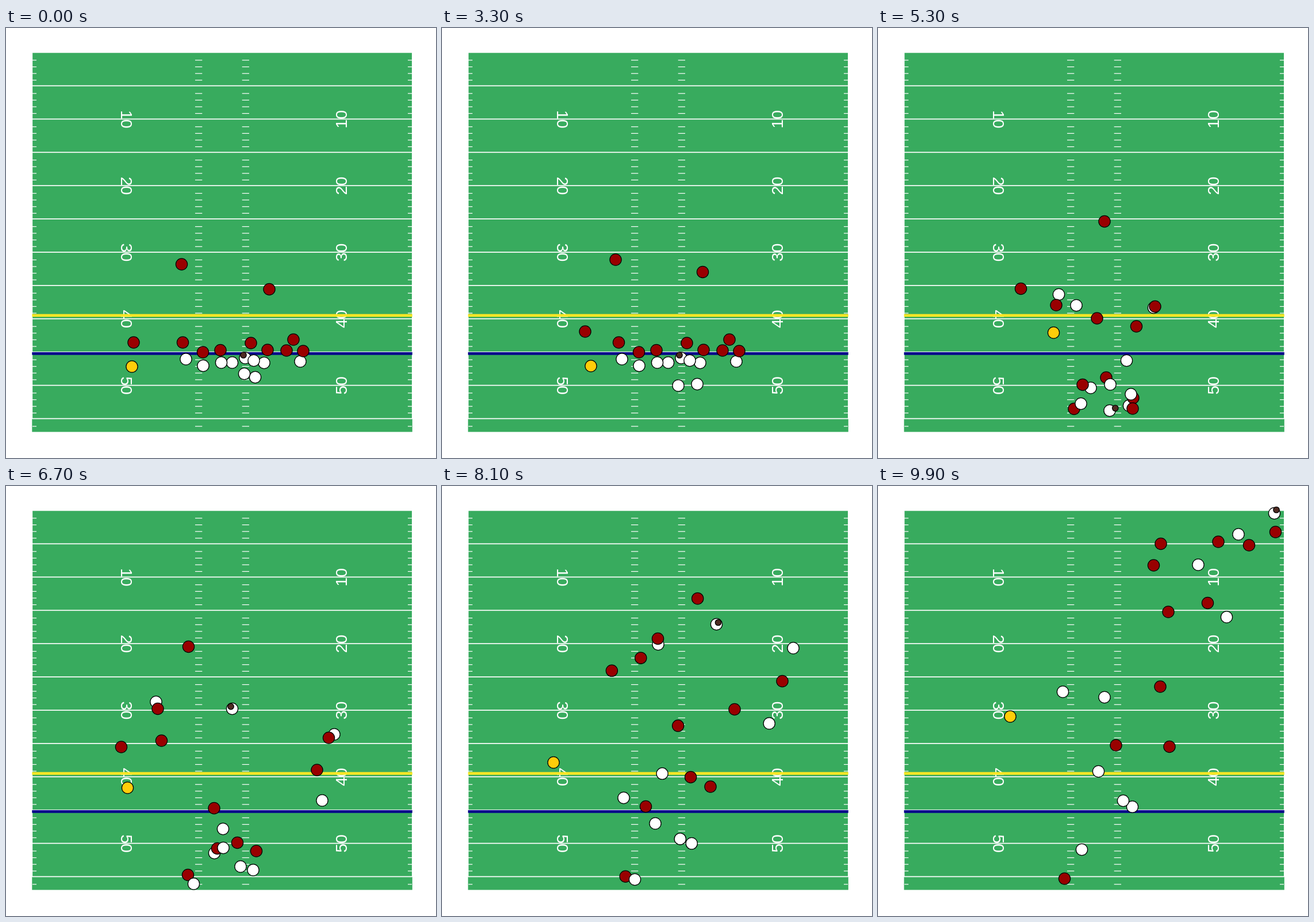
Recreate the animation shown at these times as an HTML page with a canvas. Size 748x748 px, loop 10 s.

```html
<!DOCTYPE html>
<html lang="en">
<head>
<meta charset="utf-8">
<title>Football play</title>
<style>
html, body { margin: 0; width: 100%; height: 100%; overflow: hidden; background: #fff; }
canvas { display: block; }
</style>
</head>
<body>
<canvas id="stage" width="748" height="748"></canvas>
<script>
const ctx = document.getElementById('stage').getContext('2d');
const LOOP = 10000, STEP = 100, YARD = 11.58;
const SHIFT = 2000, MOTION = 3300, SNAP = 3900, READ = 4400, PASS = 5300, RELEASE = 5600,
  CATCH = 6550, RUN = 6700, TURN = 8100, END = 9900;
const RED = '#990000', WHITE = '#fff', GOLD = '#ffcd0a', BROWN = '#4f2a22';
const players = [];

const mix = (a, b, u) => a + (b - a) * u;

// Everyone chases upfield first and bends sideways later.
const chase = (from, to) => [mix(from[0], to[0], 0.34), mix(from[1], to[1], 0.42)];

// Hold the set position, accelerate from the snap, then run or chase to the end.
function player(color, set, pass, run, end, extra = {}) {
  const { shift = set, motion = shift, read, turn = chase(run, end) } = extra;
  const go = read ? [READ, read] : [SNAP, motion];
  const keys = [[0, set], [SHIFT, shift], [MOTION, motion], go,
    [PASS, pass], [RUN, run], [TURN, turn], [END, end]];
  const times = keys.map(k => k[0]);
  const [x, y] = [0, 1].map(axis => spline(times, keys.map(k => k[1][axis])));
  const at = t => [x(t), y(t)];
  players.push({ color, at });
  return at;
}

// Monotone cubic through the points (ts, vs).
function spline(ts, vs) {
  const slope = i => (vs[i + 1] - vs[i]) / (ts[i + 1] - ts[i]);
  const last = ts.length - 1;
  const tangent = ts.map((_, i) => {
    if (i === 0) return slope(0);
    if (i === last) return slope(last - 1);
    const a = slope(i - 1), b = slope(i);
    return a * b > 0 ? 2 * a * b / (a + b) : 0;
  });
  return t => {
    let i = 0;
    while (i < last - 1 && t >= ts[i + 1]) i++;
    const h = ts[i + 1] - ts[i], u = (t - ts[i]) / h, w = 1 - u;
    return vs[i] * w * w * (1 + 2 * u) + vs[i + 1] * u * u * (3 - 2 * u)
      + h * u * w * (tangent[i] * w - tangent[i + 1] * u);
  };
}

// Receivers and the blockers drawn beneath the defence
player(WHITE, [313, 576], [314.5, 463.5], [261, 375.5], [557, 137], { turn: [376, 275.5] });
const receiver = player(WHITE, [343, 587.5], [345, 482.5], [393.5, 387.5], [689.5, 47.5], { turn: [477.5, 240.5] });
player(WHITE, [512, 580], [479.5, 486.5], [571, 432], [627, 84], { turn: [611, 282] });
player(WHITE, [393.5, 582], [370, 626], [362.5, 638.5], [321.5, 358], { turn: [316, 542.5] });
player(WHITE, [449, 582.5], [436.5, 657], [430, 668], [442.5, 558]);

// Defence, with the left tackle above the rusher
player(RED, [307.5, 547], [341, 662.5], [316.5, 676.5], [324.5, 683], { read: [331, 578.5] });
player(WHITE, [374.5, 582], [353, 653.5], [326.5, 692], [354.5, 632.5], { turn: [335.5, 684.5] });
player(RED, [342.5, 564], [356, 620.5], [367.5, 630.5], [414, 451], { turn: [354.5, 557.5] });
player(RED, [373, 560.5], [397, 608], [362, 560.5], [505, 219]);
player(RED, [455, 560], [444, 643.5], [402.5, 620.5], [491, 349]);
player(RED, [500, 542], [449.5, 519], [541, 494], [573.5, 203.5], { read: [467.5, 531.5], turn: [509, 388.5] });
player(RED, [488, 561], [443, 662], [435.5, 635], [507, 453.5], { turn: [467, 523] });
player(RED, [517, 562], [482, 484.5], [561.5, 438], [645.5, 103], { turn: [592, 339.5] });
player(RED, [426, 548], [381, 505], [270.5, 443], [492, 100.5]);
player(RED, [222, 547], [248.5, 453.5], [200.5, 454], [479.5, 138], { motion: [249, 528], read: [263.5, 502] });
player(RED, [305.5, 411], [310, 482], [264, 387.5], [592, 97], { shift: [302, 403], read: [317.5, 458.5] });
player(RED, [458, 454.5], [394, 336.5], [317.5, 279.5], [691.5, 80], { shift: [453.5, 424.5], read: [425, 386] });

// Backfield and the middle of the line
const center = player(WHITE, [416, 574], [404, 620], [377.5, 596.5], [394, 367.5]);
player(WHITE, [431, 578.5], [440, 637], [408, 662], [426.5, 547.5]);
player(WHITE, [433.5, 607.5], [432.5, 578.5], [550, 547], [606.5, 228], { shift: [444, 619.5] });
const passer = player(WHITE, [414.5, 601.5], [403, 665.5], [378, 629.5], [383.5, 496.5],
  { shift: [411, 622], turn: [371, 587] });
player(GOLD, [219, 589], [305.5, 530], [211.5, 525], [230, 401],
  { motion: [259, 588], read: [303.5, 578.5], turn: [194, 481] });

// Who holds the ball, and where it sits beside the holder
const hands = [
  { t: 0, holder: center, dx: -3, dy: -5 },
  { t: SNAP, holder: center, dx: -3, dy: -5 },
  { t: READ, holder: passer, dx: 0, dy: 4 },
  { t: RELEASE, holder: passer, dx: 13, dy: -7 },
  { t: CATCH, holder: receiver, dx: -3, dy: -4 },
  { t: TURN, holder: receiver, dx: 3, dy: -3 },
  { t: END, holder: receiver, dx: 3.5, dy: -6 }
];

function ballAt(t) {
  let i = 0;
  while (i < hands.length - 2 && t >= hands[i + 1].t) i++;
  const a = hands[i], b = hands[i + 1], u = (t - a.t) / (b.t - a.t);
  const [ax, ay] = a.holder(t), [bx, by] = b.holder(t);
  return [mix(ax + a.dx, bx + b.dx, u), mix(ay + a.dy, by + b.dy, u)];
}

function hline(x1, x2, y, width, color = WHITE) {
  ctx.fillStyle = color;
  ctx.fillRect(x1, y - width / 2, x2 - x1, width);
}

function label(text, x, y, turn) {
  ctx.save();
  ctx.translate(x, y);
  ctx.rotate(turn * Math.PI / 2);
  ctx.fillText(text, 0, 9.8);
  ctx.restore();
}

function drawField() {
  ctx.fillStyle = WHITE;
  ctx.fillRect(0, 0, 748, 748);
  ctx.fillStyle = '#38ab5e';
  ctx.fillRect(45.3, 43.3, 661.5, 659.3);
  ctx.fillStyle = WHITE;
  for (const x of [45, 706]) ctx.fillRect(x, 43, 1.2, 637);

  for (let yard = 1; yard < 57; yard++) {
    const y = 42.6 + YARD * yard;
    if (yard % 5 === 0) {
      hline(45.3, 706.8, y, 1.7);
    } else {
      for (const [x, w] of [[46, 7], [329, 12.3], [410.7, 12.3], [699, 7]]) hline(x, x + w, y + 1.8, 1.2);
    }
  }

  ctx.fillStyle = WHITE;
  ctx.font = '28.5px "Liberation Sans", Arial, sans-serif';
  ctx.textAlign = 'center';
  for (let n = 10; n <= 50; n += 10) {
    const y = 43 + YARD * n;
    label(n, 210, y, 1);
    label(n, 582.8, y, -1);
  }
  hline(45.3, 706.8, 566.3, 4.8, '#00008b');
  hline(45.3, 706.8, 500, 4.8, '#fde725');
}

function dot([x, y], r, color) {
  ctx.beginPath();
  ctx.arc(x, y, r, 0, 2 * Math.PI);
  ctx.fillStyle = color;
  ctx.fill();
  ctx.stroke();
}

function draw(t) {
  drawField();
  ctx.strokeStyle = '#000';
  ctx.lineWidth = 1.3;
  for (const p of players) dot(p.at(t), 10.1, p.color);
  dot(ballAt(t), 5.2, BROWN);
}

const start = performance.now();
function tick() {
  const t = (performance.now() - start) % LOOP;
  draw(Math.floor(t / STEP) * STEP);
  requestAnimationFrame(tick);
}
tick();
</script>
</body>
</html>
```
